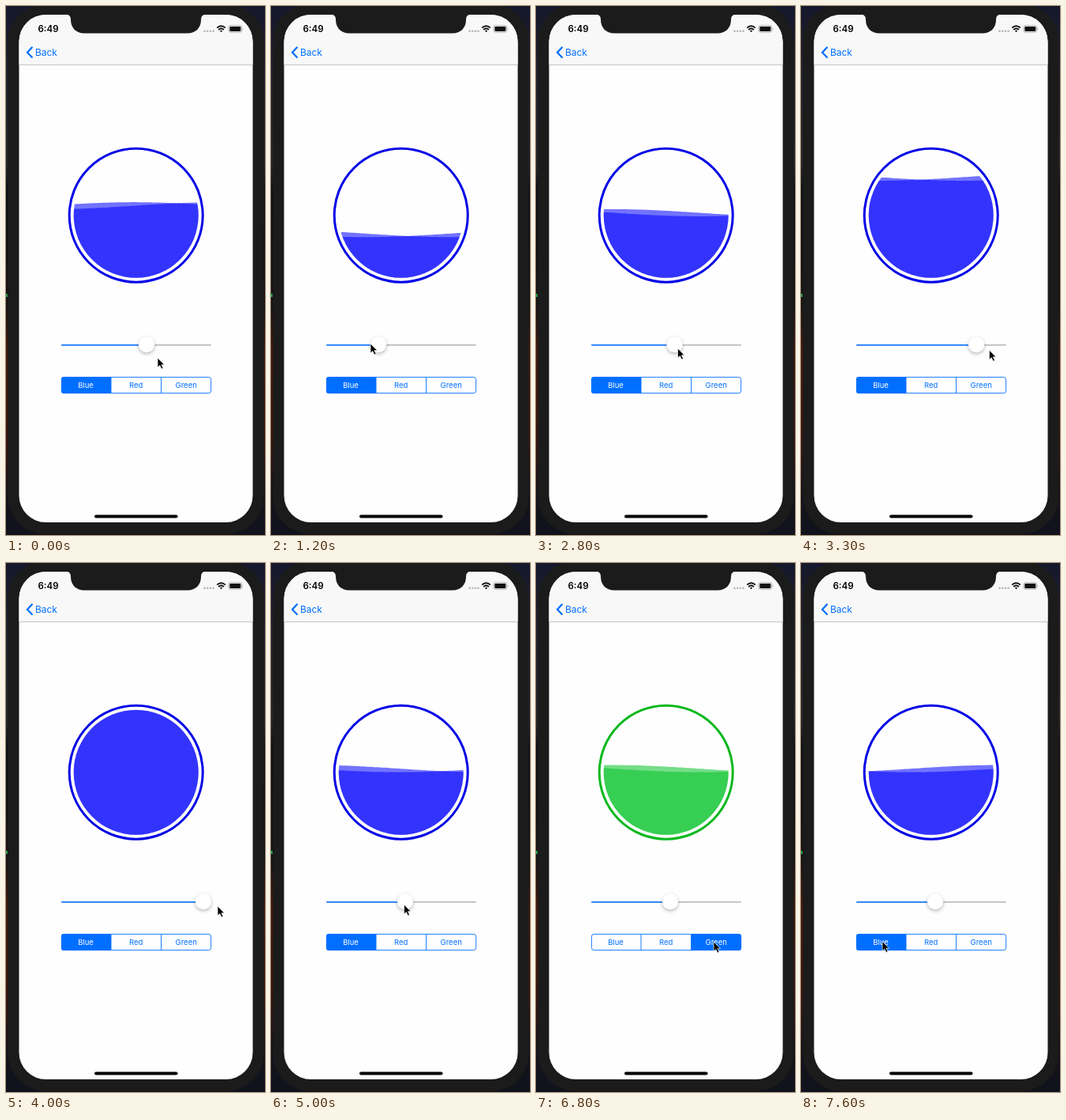
Animation of 328 by 669 pixels, one loop 7.7 s. Source, as an HTML page:

```html
<!DOCTYPE html>
<html lang="en">
<head>
<meta charset="utf-8">
<title>Wave progress</title>
<style>
  html, body { margin: 0; width: 100%; height: 100%; overflow: hidden; background: #11131f; }
  svg { display: block; width: 328px; height: 669px; }
  text { font-family: Inter, "Liberation Sans", sans-serif; }
  .tint { --ring: #0202e6; --water: rgb(0 0 255 / .55); }
  .tint.red { --ring: #ee0208; --water: rgb(230 4 27 / .55); }
  .tint.green { --ring: #08b81c; --water: rgb(4 196 40 / .55); }
  .ring { fill: none; stroke: var(--ring); stroke-width: 3; }
  .wave { fill: var(--water); }
  .tab rect { fill: none; }
  .tab text { fill: #006fff; font-size: 9.5px; text-anchor: middle; }
  .tab.on rect { fill: #006fff; }
  .tab.on text { fill: #fff; }
</style>
</head>
<body>
<svg viewBox="0 0 328 669">
  <defs>
    <linearGradient id="desk" x2="0" y2="1">
      <stop offset="0" stop-color="#15172b"/>
      <stop offset=".12" stop-color="#20222c"/>
      <stop offset=".3" stop-color="#24262a"/>
      <stop offset=".35" stop-color="#0c1116"/>
      <stop offset=".57" stop-color="#1a1413"/>
      <stop offset=".65" stop-color="#43190e"/>
      <stop offset=".82" stop-color="#39150f"/>
      <stop offset=".92" stop-color="#15131b"/>
      <stop offset="1" stop-color="#10121c"/>
    </linearGradient>
    <clipPath id="screen"><rect x="16.5" y="11" width="296" height="642" rx="34"/></clipPath>
    <clipPath id="bowl"><circle cx="164.7" cy="264.7" r="79"/></clipPath>
    <clipPath id="tabs"><rect x="70" y="469" width="190" height="21" rx="3"/></clipPath>
    <filter id="soft" x="-50%" y="-50%" width="200%" height="200%">
      <feDropShadow dx="0" dy="2" stdDeviation="2" flood-opacity=".28"/>
    </filter>
  </defs>

  <rect width="328" height="669" fill="url(#desk)"/>
  <rect y="364" width="2" height="4" fill="#20a04a"/>
  <rect x="2.5" y="-3" width="324" height="671" rx="48" fill="#1b1b1b"/>

  <g clip-path="url(#screen)">
    <rect x="16" y="11" width="297" height="643" fill="#fefefe"/>
    <rect x="16" y="11" width="297" height="63" fill="#f8f8f8"/>
    <path d="M16 74.4H313" stroke="#bcbcbc" stroke-width=".9"/>
  </g>
  <path d="M76 10.5q6 .5 6 6.5c0 11 7 17.5 17 17.5H230c10 0 17-6.500 17-17.500q0-6 6-6.500z" fill="#1b1b1b"/>

  <text x="40.500" y="33" font-size="11.500" font-weight="600">6:49</text>
  <g fill="#b5b5b5">
    <circle cx="251.500" cy="31.800" r="1.300"/><circle cx="255.200" cy="31.800" r="1.300"/>
    <circle cx="258.900" cy="31.800" r="1.300"/><circle cx="262.600" cy="31.800" r="1.300"/>
  </g>
  <g fill="none" stroke="#111" stroke-width="1.900">
    <path d="M267.200 27.600q5.300-4.800 10.600 0M269.100 30q3.400-3 6.800 0"/>
    <path d="M270.800 31.300q1.700-1.300 3.400 0l-1.700 1.900z" fill="#111" stroke="none"/>
  </g>
  <rect x="282" y="24.800" width="16.600" height="8.400" rx="2.300" fill="none" stroke="#999" stroke-width=".8"/>
  <rect x="283.300" y="26.100" width="14" height="5.800" rx="1.200" fill="#111"/>
  <path d="M299.700 27.600q1.600 1.400 0 2.800z" fill="#999"/>

  <path d="M33.500 51.800L27 58.700L33.500 65.600" fill="none" stroke="#006fff" stroke-width="2.200"/>
  <text x="37" y="63" font-size="12" letter-spacing="-.1" fill="#006fff">Back</text>

  <g class="tint" id="gauge">
    <circle class="ring" cx="164.700" cy="264.700" r="84.500"/>
    <g clip-path="url(#bowl)">
      <path class="wave" id="sine"/>
      <path class="wave" id="cosine"/>
    </g>
  </g>

  <rect x="70" y="428" width="190" height="1.600" rx=".8" fill="#b4b4b4"/>
  <rect id="fill" x="70" y="428" height="1.600" rx=".8" fill="#006fff"/>
  <circle id="thumb" cy="428" r="10.200" fill="#fff" stroke="#000" stroke-opacity=".07" stroke-width=".5" filter="url(#soft)"/>

  <g clip-path="url(#tabs)">
    <g class="tab"><rect x="70" y="469" width="63" height="21"/><text x="101" y="482.800">Blue</text></g>
    <g class="tab"><rect x="133" y="469" width="63.500" height="21"/><text x="164.700" y="482.800">Red</text></g>
    <g class="tab"><rect x="196.500" y="469" width="63.500" height="21"/><text x="228.200" y="482.800">Green</text></g>
  </g>
  <path d="M133 469.500V489.500M196.500 469.500V489.500" stroke="#006fff" stroke-width=".9"/>
  <rect x="70.400" y="469.400" width="189.200" height="20.200" rx="3" fill="none" stroke="#006fff" stroke-width=".9"/>

  <rect x="112" y="643.500" width="105.500" height="4" rx="2" fill="#000"/>
  <path id="cursor" d="M0 0V12L2.800 9.500L4.900 14L7 13L4.900 8.700H8.600Z" fill="#000" stroke="#fff" stroke-width=".7"/>
</svg>
<script>
  const LOOP = 7700, STEP = 100;
  const $ = id => document.getElementById(id);
  const tabs = document.querySelectorAll('.tab');
  const tints = ['', 'red', 'green'];

  // Each key: time, then values
  const thumbKeys = [[0, 178], [650, 178], [1200, 136], [1750, 80], [2050, 80],
    [2800, 175.5], [3600, 250], [4200, 250], [4900, 170]];
  const cursorKeys = [[0, 192, 445], [400, 179, 430], [600, 178, 428], [1200, 126, 427],
    [1700, 70, 427], [2000, 72, 429], [2800, 179.5, 433], [3500, 262, 436], [4000, 268, 434],
    [4200, 266, 433], [4900, 168.5, 432], [5300, 168.5, 432], [5700, 166.5, 477.5],
    [6100, 166.5, 477.5], [6500, 225, 479], [6900, 225, 479], [7300, 103, 478.5]];

  function at(keys, t) {
    const next = keys.findIndex(k => k[0] > t);
    if (next < 0) return keys[keys.length - 1].slice(1);
    if (next === 0) return keys[0].slice(1);
    const a = keys[next - 1], b = keys[next];
    const p = (t - a[0]) / (b[0] - a[0]);
    return a.slice(1).map((v, i) => v + (b[i + 1] - v) * p);
  }

  function wave(fn, level, phase) {
    let d = 'M84 346';
    for (let x = 84; x <= 246; x += 3) {
      const angle = (phase + (x - 164.7) * 0.83) * Math.PI / 180;
      d += `L${x} ${(level + 4.5 * fn(angle)).toFixed(2)}`;
    }
    return d + 'V346Z';
  }

  function draw(t) {
    const [x] = at(thumbKeys, t);
    $('thumb').setAttribute('cx', x);
    $('fill').setAttribute('width', x - 70);

    // The water trails the slider slightly
    const value = (at(thumbKeys, t - 55)[0] - 80) / 170;
    const level = 343.7 - 158 * value;
    const phase = 182 + 0.18 * t;
    $('sine').setAttribute('d', wave(Math.sin, level, phase));
    $('cosine').setAttribute('d', wave(Math.cos, level, phase));

    const pick = t < 5800 || t >= 7400 ? 0 : t < 6600 ? 1 : 2;
    $('gauge').setAttribute('class', 'tint ' + tints[pick]);
    tabs.forEach((tab, i) => tab.classList.toggle('on', i === pick));

    $('cursor').setAttribute('transform', `translate(${at(cursorKeys, t)})`);
  }

  const start = performance.now();
  function tick() {
    const t = (performance.now() - start) % LOOP;
    draw(Math.floor(t / STEP) * STEP);
    requestAnimationFrame(tick);
  }
  tick();
</script>
</body>
</html>
```
